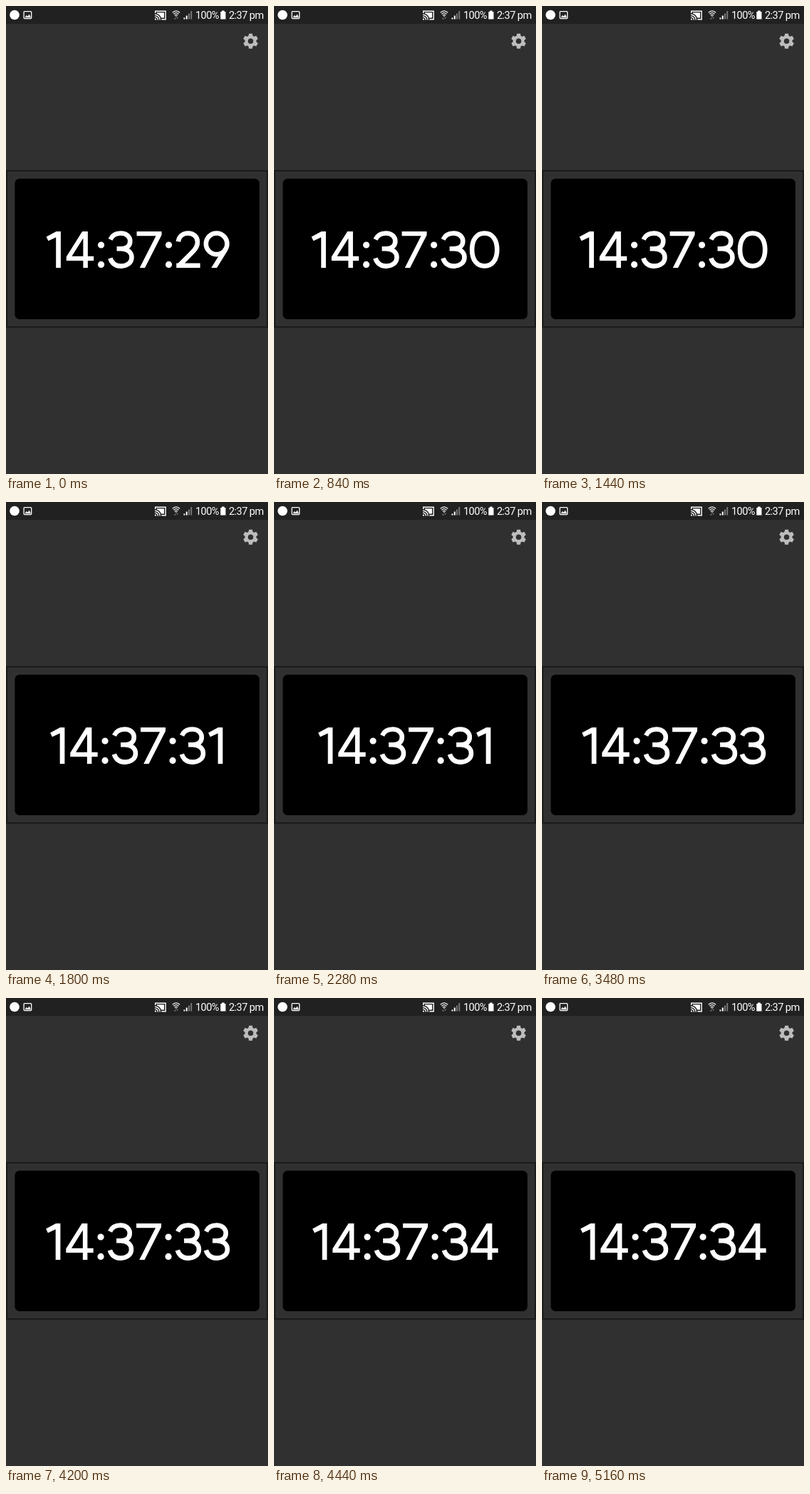
These frames come from a looping animation (368 by 656 pixels, 5280 ms). An HTML page:

```html
<!DOCTYPE html>
<html lang="en">
<head>
<meta charset="utf-8">
<title>Clock</title>
<style>
  html, body { margin: 0; width: 100%; height: 100%; overflow: hidden; background: #303030; }
  svg { display: block; }
  .status text { font: 14.6px Roboto, "Open Sans", sans-serif; letter-spacing: -.58px; fill: #fff; }
  .stroke { fill: none; stroke: #fff; stroke-width: 6.6; }
  .fill { fill: #fff; fill-rule: evenodd; }
</style>
</head>
<body>
<svg width="368" height="656" viewBox="0 0 368 656">
  <rect width="368" height="656" fill="#303030"/>

  <g class="status">
    <rect width="368" height="25" fill="#212121"/>
    <circle cx="12" cy="12.5" r="6.8" fill="#fff"/>

    <!-- picture -->
    <rect x="25.1" y="7.6" width="10.6" height="10" rx="1" fill="none" stroke="#fff" stroke-width="1.3"/>
    <path d="M26.4 16.2L28.8 12.8L30.5 14.7L32.6 11.6L35 16.2Z" fill="#fff"/>

    <!-- cast -->
    <g transform="translate(208.3 4.3) scale(.72)">
      <path d="M2 8V4H22V20H14M1 15A6 6 0 0 1 7 21M1 11A10 10 0 0 1 11 21" fill="none" stroke="#fff" stroke-width="2"/>
      <path d="M1 18A3 3 0 0 1 4 21H1ZM5 7H19V17H13.4A13 13 0 0 0 5 8.6Z" fill="#fff"/>
    </g>

    <!-- wireless -->
    <path d="M233.8 9.2Q239 4.4 244.2 9.2M235.5 11.3Q239 8 242.5 11.3M237 13.2Q239 11.4 241 13.2" fill="none" stroke="#fff" stroke-width="1.2"/>
    <path d="M238 14H240L239 15.4Z" fill="#fff"/>
    <path d="M236 18.5L237.4 15.8L238.7 18.5ZM239.4 15.8H242L240.7 18.5Z" fill="#777"/>

    <!-- signal -->
    <path d="M249.5 16.5H251.5V18.5H249.5ZM252.8 13.5H254.8V18.5H252.8Z" fill="#fff"/>
    <path d="M256 10.5H258V18.5H256ZM259.2 7H261.2V18.5H259.2Z" fill="#777"/>

    <text x="266" y="18.3">100%</text>
    <path d="M303.1 6.5H306.7V8H308.5V18.6H301.3V8H303.1Z" fill="#fff"/>
    <text x="313" y="18.3">2:37 pm</text>
  </g>

  <!-- settings -->
  <g transform="translate(343.6 49.2) scale(1.05)" fill="#bdbdbd">
    <circle r="7.6"/>
    <g id="teeth"></g>
    <circle r="3.6" fill="#303030"/>
  </g>

  <rect x="1" y="231" width="366" height="219" fill="none" stroke="#1b1b1b" stroke-width="2"/>
  <rect x="12.4" y="242" width="343.6" height="197" rx="6.5"/>
  <g id="clock" role="img"></g>
</svg>

<script>
const LOOP = 5280;
const TICKS = [0, 840, 1800, 2640, 3480, 4440];
const FIRST = 29, CENTER = 187.1, TOP = 316;

// Each glyph: advance width, stroked outline, filled outline.
const GLYPHS = {
  0: [47, "M21.1 2.5C32 2.5 38.7 11.2 38.7 25.5S32 48.5 21.1 48.5S3.5 39.8 3.5 25.5S10.2 2.5 21.1 2.5Z", ""],
  1: [28, "", "M20.3 0H14L0 7.6L2.8 13.2L13.6 8.2V51H20.3Z"],
  2: [39, "M3.3 14.2C4.6 6.8 9.8 2.5 17 2.5C25.2 2.5 30.4 7.7 30.4 14.8C30.4 20 28.4 23.7 24.4 27.8L4.4 47.8M.7 47.8H34.1", ""],
  3: [40, "M3 11.4C5.5 5.6 10.8 2.5 17.5 2.5C25.7 2.5 30.7 7.4 30.7 13.7C30.7 20.2 25.7 24.2 18 24.2H12M18 24.2C26.8 24.2 32.9 28.9 32.9 36.2C32.9 43.9 26.2 48.6 18 48.6C10.2 48.6 5 44.3 2.8 37.4", ""],
  4: [44, "", "M22.5 0H30.3V34.8H38.6V41H30.3V51H23.8V41H.2V35.5ZM23.8 9.5L7.9 34.8H23.8Z"],
  7: [40, "", "M0 0H35V5L11.5 51H4.2L27 6.2H0Z"],
  9: [40, "M32.9 17.3A14.8 14.8 0 1 1 3.3 17.3A14.8 14.8 0 1 1 32.9 17.3Z", "M33.5 26.9L18.5 51H10.7L27.9 23.4Z"],
  ":": [15, "", "M.4 19a4.6 4.6 0 1 1 9.2 0a4.6 4.6 0 1 1 -9.2 0ZM.4 46.4a4.6 4.6 0 1 1 9.2 0a4.6 4.6 0 1 1 -9.2 0Z"]
};

const clock = document.getElementById("clock");
const advance = ch => GLYPHS[ch][0];

function draw(label) {
  const width = [...label].reduce((sum, ch) => sum + advance(ch), 0);
  let x = CENTER - width / 2;
  clock.innerHTML = [...label].map(ch => {
    const [step, stroke, fill] = GLYPHS[ch];
    const glyph = `<g transform="translate(${x} ${TOP})">
      <path class="stroke" d="${stroke}"/><path class="fill" d="${fill}"/></g>`;
    x += step;
    return glyph;
  }).join("");
  clock.setAttribute("aria-label", label);
}

document.getElementById("teeth").innerHTML = [0, 60, 120, 180, 240, 300]
  .map(a => `<path transform="rotate(${a})" d="M-2.3 -10H2.3L3.1 -5.5H-3.1Z"/>`).join("");

let shown = -1;
function update() {
  const t = performance.now() % LOOP;
  const index = TICKS.filter(tick => tick <= t).length - 1;
  if (index !== shown) {
    shown = index;
    draw("14:37:" + (FIRST + index));
  }
  requestAnimationFrame(update);
}
update();
</script>
</body>
</html>
```
